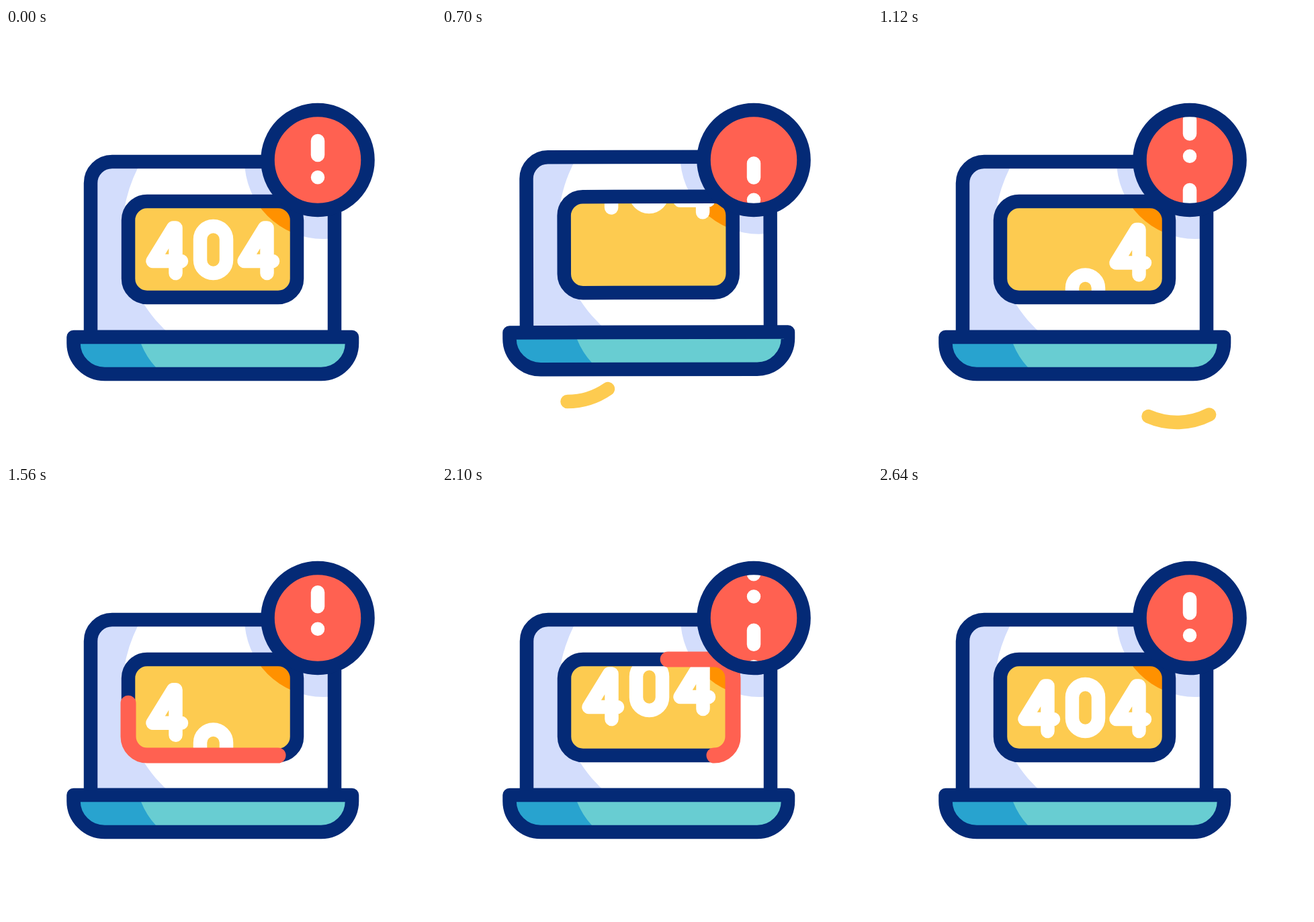
Write an HTML page that moves like this. It is 640 px wide and 640 px high and loops after 2.76 s.

```html
<!DOCTYPE html>
<html lang="en">
<head>
<meta charset="utf-8">
<title>404</title>
<style>
  html, body { margin: 0; height: 100%; overflow: hidden; background: #fff; }
  svg { display: block; width: 100vw; height: 100vh; fill: none; stroke-linecap: round; stroke-linejoin: round; }
  .outline { stroke: #042a76; stroke-width: 20.5; }
  .glyph { stroke: #fff; stroke-width: 20.5; }
  .whoosh { stroke: #fdcb50; stroke-width: 20.5; }
</style>
</head>
<body>
<svg viewBox="0 0 640 640">
  <defs>
    <path id="screen" d="M126 460V231a32 32 0 0 1 32-32H457a32 32 0 0 1 32 32V460z"/>
    <path id="base" d="M100.5 460H515V469a46 46 0 0 1-46 46H147a46.500 46 0 0 1-46.500-46z"/>
    <path id="panel" d="M405 401H210a28 28 0 0 1-28-28V286a28 28 0 0 1 28-28H405a28 28 0 0 1 28 28V373a28 28 0 0 1-28 28z"/>
    <path id="four" d="M252.500 365V297.500H249L218.500 347H261"/>
    <path id="bang" d="M464 168V189M464 222.300v.01"/>
    <clipPath id="inScreen"><use href="#screen"/></clipPath>
    <clipPath id="inBase"><use href="#base"/></clipPath>
    <clipPath id="inPanel"><use href="#panel"/></clipPath>
    <clipPath id="inBadge"><circle cx="464" cy="196.500" r="66"/></clipPath>
  </defs>

  <circle id="whooshLeft" class="whoosh" r="106" pathLength="1" transform="translate(186.500 450) rotate(90)"/>
  <circle id="whooshRight" class="whoosh" r="106" pathLength="1" transform="translate(445 481) scale(-1 1) rotate(66)"/>

  <g id="laptop">
    <use href="#screen" fill="#fff"/>
    <g clip-path="url(#inScreen)" fill="#d3ddfc">
      <path d="M110 190H207A204 204 0 0 0 250 461H110z"/>
      <circle cx="472" cy="197" r="117"/>
    </g>
    <use href="#screen" class="outline"/>
    <use href="#base" fill="#68cdd2"/>
    <path clip-path="url(#inBase)" fill="#28a3cf" d="M90 455H196L201 470Q209 490 223 505L235 520H90z"/>
    <use href="#base" class="outline"/>

    <use href="#panel" fill="#fdcb50"/>
    <g clip-path="url(#inPanel)">
      <circle cx="472" cy="197" r="117" fill="#ff9100"/>
      <g class="glyph">
        <use class="digit" href="#four"/>
        <rect class="digit" x="289" y="295" width="39" height="70" rx="19.500"/>
        <use class="digit" href="#four" x="136"/>
      </g>
    </g>
    <use href="#panel" class="outline"/>
  </g>

  <path id="alarm" stroke="#ff6151" stroke-width="23" pathLength="1"
    d="M405 401H210a28 28 0 0 1-28-28V286a28 28 0 0 1 28-28H405a28 28 0 0 1 28 28V373a28 28 0 0 1-28 28"/>

  <circle cx="464" cy="196.500" r="74.500" fill="#ff6151"/>
  <g clip-path="url(#inBadge)">
    <g id="bangs" class="glyph">
      <use href="#bang"/>
      <use href="#bang" y="-104.500"/>
    </g>
  </g>
  <circle class="outline" cx="464" cy="196.500" r="74.500"/>
</svg>
<script>
const LOOP = 2760, STAGGER = 128;
const $ = id => document.getElementById(id);
const digits = document.querySelectorAll('.digit');

const ease = (t, from, to) => {
  const u = Math.min(1, Math.max(0, (t - from) / (to - from)));
  return u * u * (3 - 2 * u);
};

// Sum of eased moves between [time, value] keys
const keyed = (t, keys) => keys.slice(1).reduce((sum, [time, value], i) =>
  sum + (value - keys[i][1]) * ease(t, keys[i][0], time), keys[0][1]);

// Smooth curve through [time, value] points, at rest at both ends
function spline(t, points) {
  const last = points.length - 1;
  if (t <= points[0][0]) return points[0][1];
  if (t >= points[last][0]) return points[last][1];
  const i = points.findIndex(p => p[0] > t) - 1;
  const slope = k => k === 0 || k === last ? 0 :
    (points[k + 1][1] - points[k - 1][1]) / (points[k + 1][0] - points[k - 1][0]);
  const [t0, a] = points[i], [t1, b] = points[i + 1];
  const d = t1 - t0, u = (t - t0) / d, v = 1 - u;
  return a * v * v * (1 + 2 * u) + b * u * u * (3 - 2 * u)
    + d * u * v * (slope(i) * v - slope(i + 1) * u);
}

function trim(path, start, end) {
  path.style.display = end - start > 1e-4 ? '' : 'none';
  path.style.strokeDasharray = `${end - start} 2`;
  path.style.strokeDashoffset = -start;
}

const lift = [[200, 0], [400, -6.7], [740, -7], [1040, 0]];
const tilt = [[200, 0], [440, -1], [720, -0.1], [870, 0.5], [1040, 0]];
const bounce = [[200, 0], [312, -10.5], [440, -82], [572, -92], [700, -91], [864, 2],
  [992, 72], [1120, 113], [1210, 122], [1304, 110], [1432, 68], [1560, 6],
  [1700, -26], [1844, -33], [1972, -31], [2100, -18], [2384, 0]];
const roll = [[325, 0], [730, 140], [1570, -9.7], [2640, 104.5]];

function draw(now) {
  const t = now % LOOP;
  trim($('whooshLeft'), ease(t, 432, 765), ease(t, 335, 667));
  trim($('whooshRight'), ease(t, 1115, 1415), ease(t, 1050, 1350));
  trim($('alarm'), ease(t, 1633, 2393), ease(t, 1237, 1997));
  $('laptop').setAttribute('transform',
    `translate(0 ${keyed(t, lift)}) rotate(${keyed(t, tilt)} 307.5 480)`);
  digits.forEach((digit, i) =>
    digit.setAttribute('transform', `translate(0 ${spline(t - i * STAGGER, bounce)})`));
  $('bangs').setAttribute('transform', `translate(0 ${keyed(t, roll)})`);
}

const begin = performance.now();
function tick() {
  draw(performance.now() - begin);
  requestAnimationFrame(tick);
}
tick();
</script>
</body>
</html>
```
